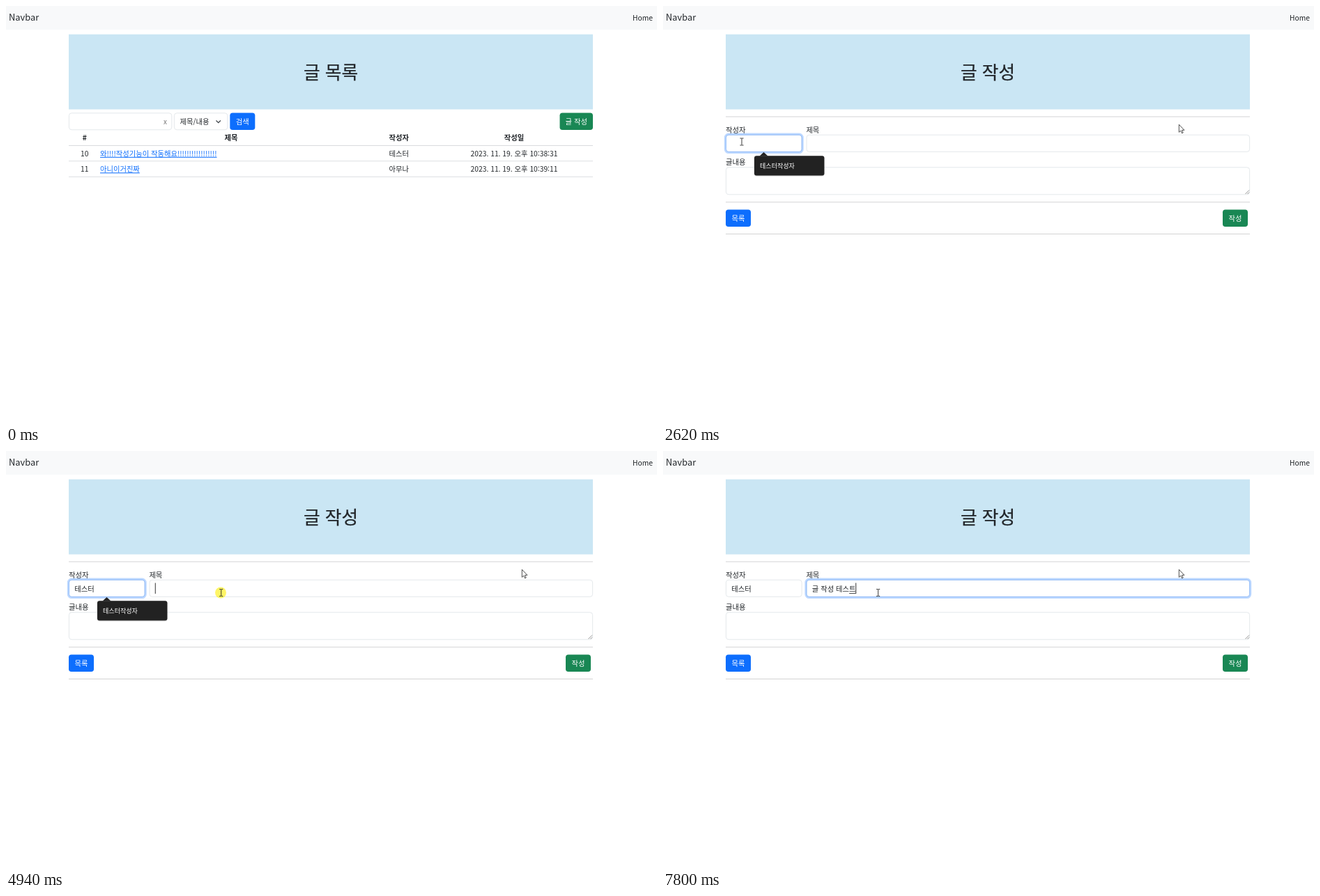
Animation of 934x599 px, one loop 8 s. Source, as an HTML page:

```html
<!DOCTYPE html>
<html lang="ko">
<head>
<meta charset="utf-8">
<style>
html, body { margin: 0; width: 100%; height: 100%; overflow: hidden; background: #fff; }
svg { display: block; width: 934px; height: 599px; }
text { font: 10.3px "Noto Sans CJK KR", "Noto Sans CJK", "Noto Sans", sans-serif; fill: #212529; white-space: pre; }
.mid { text-anchor: middle; }
.bold { font-weight: 700; }
.brand { font-size: 12.87px; }
.title { font-size: 25.7px; font-weight: 500; stroke: #212529; stroke-width: .25; }
.white { fill: #fff; }
.link { fill: #0d6efd; text-decoration: underline; }
.tip { font-size: 9.06px; fill: #fff; }
.status { font-size: 7.4px; fill: #dadce0; }
.clear { font-size: 9.8px; fill: #777; }
</style>
</head>
<body>
<svg id="stage" viewBox="0 0 934 599"></svg>
<script>
const text = (x, y, s, cls = '') => `<text x="${x}" y="${y}" class="${cls}">${s}</text>`;
const rect = (x, y, w, h, fill, r = 0, extra = '') =>
  `<rect x="${x}" y="${y}" width="${w}" height="${h}" rx="${r}" fill="${fill}" ${extra}/>`;
const field = (x, y, w, h) => rect(x, y, w, h, '#fff', 3.8, 'stroke="#dee2e6" stroke-width=".8"');
const button = (x, y, w, label, fill, id = '') =>
  rect(x, y, w, 24.6, fill, 3.8, id && `id="${id}"`) + text(x + w / 2, y + 16.3, label, 'mid white');
const line = (y, color = '#c8c9ca') => rect(90, y, 752, .8, color);
const focus = (id, x, w) => `<g id="${id}">` +
  rect(x - 1.3, 183.9, w + 2.6, 26.8, 'none', 5, 'stroke="#0d6efd" stroke-opacity=".27" stroke-width="2.6"') +
  rect(x, 185.2, w, 24.2, 'none', 3.8, 'stroke="#86b7fe" stroke-width=".8"') + '</g>';
const row = (y, no, title, author, date) => text(112.7, y, no, 'mid') + text(135, y, title, 'link') +
  text(563.7, y, author, 'mid') + text(729, y, date, 'mid') + line(y + 6.6, '#d5d8db');

const arrow = `<path d="M0 0V11L2.5 8.7 4.2 12.5 5.9 11.7 4.3 8H7.6Z" fill="#fff" stroke="#222" stroke-width=".8"/>`;
const hand = `<path d="M-1 1Q0-.5 1 1V5L5 6Q6.5 6.5 6.3 8L5.5 13.5H-.5L-3.6 9Q-4-.0 -1 8.4Z" fill="#fff" stroke="#222" stroke-width=".8"/>`;
const beam = `<path d="M-2.5-5H-.6L0-4.5 .6-5H2.5M0-4.5V4.5M-2.5 5H-.6L0 4.5 .6 5H2.5" fill="none" stroke="#222" stroke-width=".9"/>`;

const $ = id => document.getElementById(id);
$('stage').innerHTML =
  rect(0, 0, 934, 34, '#f8f9fa') + text(4, 21, 'Navbar', 'brand') + text(899, 20.5, 'Home') +
  rect(90, 40.7, 752, 107.8, '#cae6f4') +
  '<g id="list">' +
    text(466, 105.3, '글 목록', 'mid title') +
    field(90.4, 153.8, 147.4, 24) + text(226, 170.3, 'x', 'clear') +
    field(241.4, 153.8, 76.4, 24) + text(249.5, 169.9, '제목/내용') +
    '<path d="M301.5 164.5l3.2 3.2 3.2-3.2" fill="none" stroke="#343a40" stroke-width="1.1"/>' +
    button(321.3, 153.5, 36, '검색', '#0d6efd') + button(794.5, 153.5, 47.5, '글 작성', '#198754', 'writeBtn') +
    text(112.7, 193.3, '#', 'mid bold') + text(323, 193.3, '제목', 'mid bold') +
    text(563.7, 193.3, '작성자', 'mid bold') + text(729, 193.3, '작성일', 'mid bold') + line(200, '#d0d3d6') +
    row(215.8, 10, '와!!!!작성기능이 작동해요' + '!'.repeat(17), '테스터', '2023. 11. 19. 오후 10:38:31') +
    row(238.3, 11, '아니이거진짜', '아무나', '2023. 11. 19. 오후 10:39:11') +
  '</g><g id="write">' +
    text(466, 105.3, '글 작성', 'mid title') +
    line(158.6) + text(90, 181.7, '작성자') + text(205.4, 181.7, '제목') +
    field(90.4, 185.2, 108.7, 24.2) + field(206, 185.2, 635.6, 24.2) +
    text(90, 228, '글내용') + field(90.4, 231.8, 751.2, 39) +
    '<path d="M835.5 270l5.5-5.5M838.5 270l2.5-2.5" stroke="#777" stroke-width=".8"/>' +
    line(281.4) + line(327.1) +
    button(90, 292.4, 36, '목록', '#0d6efd') + button(803, 292.4, 36, '작성', '#198754') +
    focus('ring0', 90.4, 108.7) + focus('ring1', 206, 635.6) +
    text(98.3, 201.6, '', '" id="text0') + text(213.8, 201.6, '', '" id="text1') +
    rect(0, 204, 9.2, .8, '#212529', 0, 'id="under"') + rect(0, 189.5, .8, 15.5, '#000', 0, 'id="caret"') +
    '<g id="tip">' + rect(130.6, 215.8, 101.2, 28.8, '#000', 4, 'opacity=".18"') +
      rect(131, 215.2, 100.4, 28.3, '#222', 3) + '<path d="M138.5 215.5L144.5 210l6 5.5z" fill="#222"/>' +
      text(139, 232.7, '테스터작성자', 'tip') + '</g>' +
    `<g id="ghost" transform="translate(740.3 170.3)" opacity=".12">${arrow}</g>` +
  '</g>' +
  `<g id="status">${rect(-4, 590, 78, 14, '#202124', 2)}${text(0, 599, 'test-host:3000/write', 'status')}</g>` +
  `<g id="pointer"><circle id="click" r="8" cx="-.7" fill="#ffee00" opacity=".6"/>` +
  `<g id="arrow">${arrow}</g><g id="hand">${hand}</g><g id="beam">${beam}</g></g>`;

// Typed states: [time, value]
const typing = [
  [[3420, 'ㅌ'], [3490, '테'], [3560, '텟'], [3700, '테스'], [3840, '테슽'], [3980, '테스터']],
  [[5800, 'ㄱ'], [5930, '그'], [6000, '글'], [6130, '글 '], [6270, '글 ㅈ'], [6400, '글 자'],
   [6600, '글 작'], [6730, '글 잓'], [6860, '글 작서'], [7060, '글 작성'], [7130, '글 작성 '],
   [7260, '글 작성 ㅌ'], [7460, '글 작성 테'], [7530, '글 작성 테스'], [7730, '글 작성 테슽'], [7800, '글 작성 테스트']]
];
// Pointer moves: start, steps, from, to
const moves = [
  [500, 4, [920, 163], [811, 169], p => 1 - (1 - p) ** 2],
  [1120, 2, [811, 169], [812, 161], p => p],
  [1390, 8, [812, 161], [113, 195], p => p < .5 ? 2 * p * p : 1 - 2 * (1 - p) ** 2],
  [4450, 7, [113, 195], [308.7, 203.5], p => p < .5 ? 2 * p * p : 1 - 2 * (1 - p) ** 2]
];

const ramp = (t, a, b) => Math.min(1, Math.max(0, (t - a) / (b - a)));
const within = (t, a, b) => t >= a && t < b;
const show = (id, on) => $(id).setAttribute('opacity', +on);
const valueAt = (list, t) => list.reduce((v, [at, s]) => t >= at ? s : v, '');

function pointerAt(t) {
  const move = moves.findLast(m => t >= m[0]);
  if (!move) return null;
  const [start, steps, from, to, ease] = move;
  const p = ease(Math.min(1, (Math.floor((t - start) / 70) + 1) / steps));
  return from.map((v, i) => v + (to[i] - v) * p);
}

function tipOpacity(t) {
  if (t < 2150) return 0;
  if (t < 2290) return ramp(t, 2100, 2290);
  // The suggestion fades while the typed text does not match it.
  const start = [3420, 3560, 3840].find(s => within(t, s, s + (s === 3420 ? 70 : 140))) ?? (t >= 5755 ? 5755 : t);
  return 1 - ramp(t, start, start + 250) ** 2;
}

function drawText(t) {
  const active = t < 4940 ? 0 : 1;
  typing.forEach((list, i) => $('text' + i).textContent = valueAt(list, t));
  const node = $('text' + active), value = node.textContent;
  const x = [98.3, 213.8][active] + (value ? node.getComputedTextLength() : 0);
  const last = Math.max(...[2090, 4940, ...typing.flat().map(e => e[0])].filter(at => at <= t));
  // While idle the caret blinks; it starts visible after each input.
  const lit = t >= 2090 && Math.floor((t - last) / 530) % 2 === 0;
  $('caret').setAttribute('x', x);
  $('under').setAttribute('x', x - 9.3);
  show('caret', lit);
  show('under', value && !value.endsWith(' '));
}

function draw(t) {
  const onList = t < 1120;
  show('list', onList);
  show('write', !onList);
  $('writeBtn').setAttribute('fill', within(t, 980, 1120) ? '#157347' : '#198754');
  show('status', within(t, 980, 1460));
  show('ghost', t >= 1530);
  show('ring0', ramp(t, 2080, 2230) * (1 - ramp(t, 4960, 5140)));
  show('ring1', ramp(t, 4960, 5140));
  show('tip', tipOpacity(t));
  drawText(t);

  const pos = pointerAt(t);
  show('pointer', !!pos);
  if (!pos) return;
  const [x, y] = pos;
  const kind = onList && x < 842 ? 'hand' : y > 185 ? 'beam' : 'arrow';
  $('pointer').setAttribute('transform', `translate(${x} ${y})`);
  ['arrow', 'hand', 'beam'].forEach(k => show(k, k === kind));
  show('click', .6 * (within(t, 780, 980) || within(t, 2080, 2220) || within(t, 4940, 5070)));
}

const begin = performance.now();
function tick() {
  draw((performance.now() - begin) % 8000);
  requestAnimationFrame(tick);
}
tick();
</script>
</body>
</html>
```
